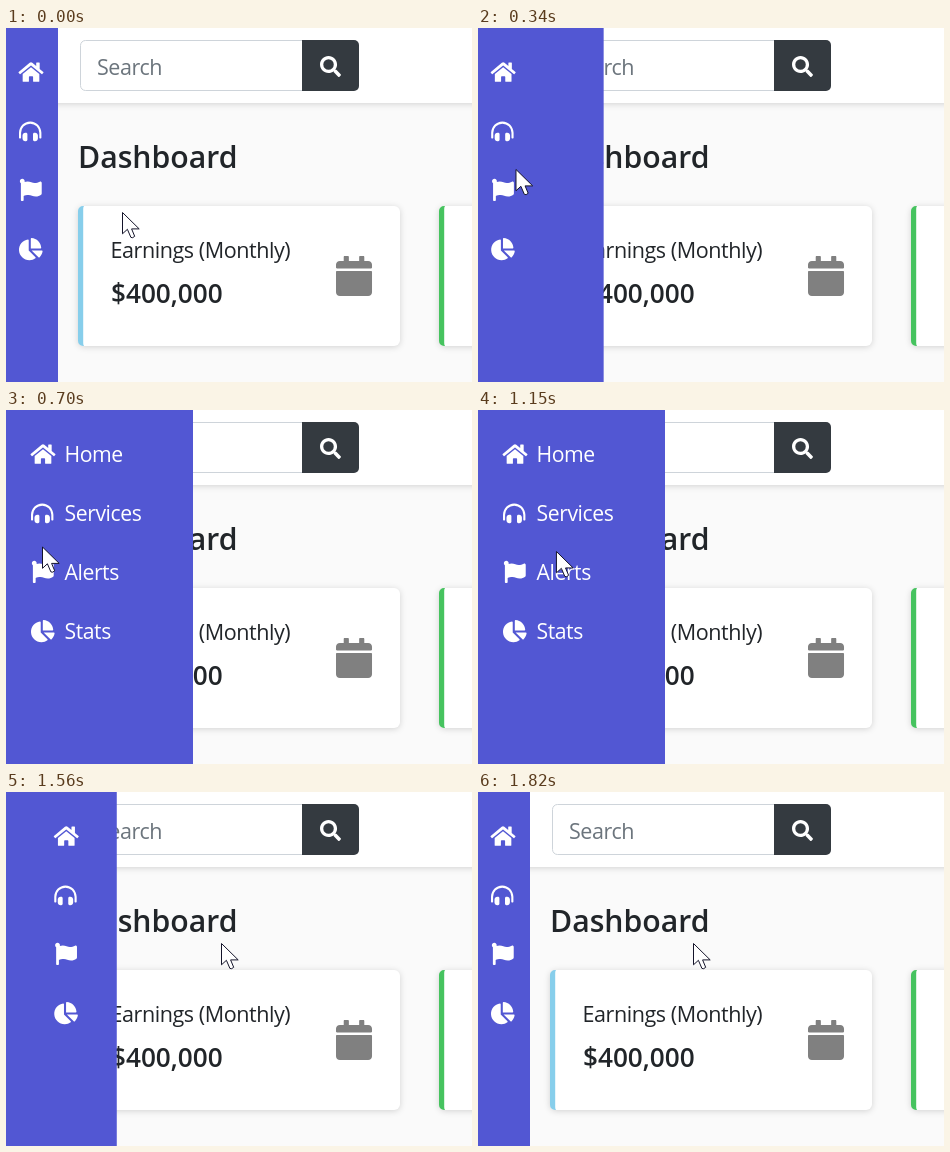
Animation, 466 px wide and 354 px high, one loop 2000 ms. Source, as an HTML page:

```html
<!DOCTYPE html>
<html lang="en">
<head>
<meta charset="utf-8">
<title>Dashboard</title>
<style>
  html, body { margin: 0; width: 100%; height: 100%; overflow: hidden; background: #fafafa; }
  svg { display: block; width: 100vw; height: 100vh; }
  text { font-family: "Open Sans", "Noto Sans", sans-serif; font-size: 21.5px; letter-spacing: -.02em; fill: #212529; white-space: pre; }
  .bold { font-weight: 600; letter-spacing: 0; }
  .side text, .side path { fill: #fff; }
  .side text { font-size: 21.2px; }
  .soft { filter: drop-shadow(0 1px 3px rgba(0, 0, 0, .16)); }
</style>
</head>
<body>
<svg viewBox="0 0 466 354">
  <rect width="466" height="354" fill="#fafafa"/>
  <rect class="soft" x="-10" y="-10" width="486" height="85" fill="#fff"/>

  <rect x="74.5" y="12.5" width="240" height="50" rx="5" fill="#fff" stroke="#ced4da"/>
  <path d="M296 12h52a5 5 0 0 1 5 5v41a5 5 0 0 1-5 5h-52z" fill="#343a40"/>
  <path transform="translate(314 28) scale(.041)" fill="#fff" d="M505 442.7L405.3 343c-4.500-4.500-10.600-7-17-7H372c27.600-35.300 44-79.700 44-128C416 93.100 322.900 0 208 0S0 93.100 0 208s93.100 208 208 208c48.300 0 92.700-16.400 128-44v16.300c0 6.400 2.500 12.500 7 17l99.700 99.700c9.400 9.400 24.600 9.400 33.900 0l28.300-28.300c9.400-9.400 9.400-24.600.1-34zM208 336a128 128 0 1 1 0-256a128 128 0 0 1 0 256z" fill-rule="evenodd"/>
  <text x="91" y="47" style="fill:#6c757d">Search</text>

  <text class="bold" x="72" y="140" style="font-size:30.2px">Dashboard</text>

  <g class="soft">
    <rect x="72" y="178" width="322" height="140" rx="6" fill="#fff"/>
    <rect x="433" y="178" width="322" height="140" rx="6" fill="#fff"/>
  </g>
  <path id="edge" d="M78 178h-1a5 5 0 0 0-5 5v130a5 5 0 0 0 5 5h1q-.8-1-.8-3V181q0-2 .8-3z" fill="#87ceeb"/>
  <use href="#edge" x="361" style="display:none"/>
  <path transform="translate(361 0)" d="M78 178h-1a5 5 0 0 0-5 5v130a5 5 0 0 0 5 5h1q-.8-1-.8-3V181q0-2 .8-3z" fill="#46c35f"/>
  <text x="104.5" y="230">Earnings (Monthly)</text>
  <text class="bold" x="105" y="274.5" style="font-size:26.2px">$400,000</text>
  <path transform="translate(330 228) scale(.0804 .0783)" fill="#808080" d="M12 192h424c6.600 0 12 5.400 12 12v260c0 26.500-21.500 48-48 48H48c-26.500 0-48-21.500-48-48V204c0-6.600 5.400-12 12-12zm436-44v-36c0-26.500-21.500-48-48-48h-48V12c0-6.600-5.400-12-12-12h-40c-6.600 0-12 5.400-12 12v52H160V12c0-6.600-5.400-12-12-12h-40c-6.600 0-12 5.400-12 12v52H48C21.500 64 0 85.500 0 112v36c0 6.600 5.400 12 12 12h424c6.600 0 12-5.400 12-12z"/>

  <g class="side">
    <rect id="bar" width="52" height="354" fill="#5257d3"/>
    <g id="labels">
      <text y="52">Home</text>
      <text y="111">Services</text>
      <text y="170">Alerts</text>
      <text y="229">Stats</text>
    </g>
    <g id="icons">
      <path transform="translate(0 33) scale(.0434)" d="M280.400 148.300L96 300V464a16 16 0 0 0 16 16h112a16 16 0 0 0 16-16V368a16 16 0 0 1 16-16h64a16 16 0 0 1 16 16v96a16 16 0 0 0 16 16h112a16 16 0 0 0 16-16V300L295.700 148.300a12 12 0 0 0-15.300 0zM571.600 251.500L488 182.600V44a12 12 0 0 0-12-12h-56a12 12 0 0 0-12 12v72.600L318.500 43a48 48 0 0 0-61 0L4.300 251.500a12 12 0 0 0-1.600 16.900l25.500 31A12 12 0 0 0 45 301l235.400-193.700a12 12 0 0 1 15.300 0L531 301a12 12 0 0 0 16.900-1.600l25.500-31a12 12 0 0 0-1.800-16.900z"/>
      <path transform="translate(.5 92.2) scale(.04375)" d="M160 288h-16c-35.400 0-64 28.700-64 64.100v63.800c0 35.400 28.600 64.100 64 64.100h16c17.700 0 32-14.400 32-32V320c0-17.700-14.300-32-32-32zm208 0h-16c-17.700 0-32 14.300-32 32v128c0 17.700 14.300 32 32 32h16c35.400 0 64-28.700 64-64.100v-63.800c0-35.400-28.600-64.100-64-64.100zM256 32C112.900 32 4.600 151.100 0 288v112a16 16 0 0 0 16 16h16a16 16 0 0 0 16-16V288a208 208 0 0 1 416 0v112a16 16 0 0 0 16 16h16a16 16 0 0 0 16-16V288C507.400 151.100 399.100 32 256 32z"/>
      <path transform="translate(1 150.8) scale(.0434)" d="M349.600 98.800C296 98.800 251.700 64 184.300 64c-25 0-47.300 4.400-68 12a56 56 0 0 0 3.600-23.500C118 24 94.800 1.200 66.300 0 34.300-1.200 8 24.300 8 56c0 19 9.500 35.800 24 46V488c0 13.300 10.700 24 24 24h16c13.300 0 24-10.700 24-24v-94.400c28.300-12 63.600-22.100 114.400-22.100 53.600 0 97.900 34.800 165.200 34.800 48.200 0 86.700-16.300 122.500-40.900 8.700-6 13.900-15.800 13.900-26.400V96c0-23.400-24.300-38.900-45.500-29-34.300 15.900-76.400 31.800-116.900 31.800z"/>
      <path transform="translate(.5 210) scale(.0434)" d="M527.800 288H290.500l158 158c6 6 16 6.500 22.200.7 38.700-36.500 65.300-85.600 73.100-140.900 1.400-9.400-6.500-17.800-16-17.800zM512 223.200C503.700 103.700 408.300 8.300 288.800 0 279.700-.6 272 7.100 272 16.200V240h223.800c9.100 0 16.800-7.700 16.200-16.800zM224 288V50.700c0-9.500-8.400-17.400-17.800-16C87 51.500-4 155.600 0 280.400 4.500 408.500 114.800 513.600 243 512c50.400-.6 97-16.900 135.300-44 7.900-5.600 8.400-17.300 1.600-24.100L224 288z"/>
    </g>
  </g>

  <path id="arrow" d="M.5.5V21.800L5.400 17.300L8.900 25.400Q10.500 26.500 12.700 24.300L9.600 16.900H17.200Z" fill="#fff" stroke="#14142a" stroke-linejoin="round"/>
  <path id="beam" d="M-6-13.500h4q2 0 2 2v23q0 2-2 2h-4M6-13.500h-4q-2 0-2 2M6 13.500h-4q-2 0-2-2" fill="none" stroke="#ececee" stroke-width="1.300"/>
</svg>
<script>
const LOOP = 2000, NARROW = 52, WIDE = 187;
const OPEN = { at: 178, len: 430 }, CLOSE = { at: 1409, len: 385 };
const BEAM = [1415, 1470];
// time, x, y of the pointer
const TRAIL = [
  [15, 116, 184], [180, 50, 149], [340, 37.5, 141], [600, 36, 136.5],
  [990, 36, 136.5], [1150, 77.5, 141], [1400, 186, 149], [1440, 213.5, 150.5], [1490, 215, 151]
];
const [bar, labels, icons, arrow, beam] =
  ["bar", "labels", "icons", "arrow", "beam"].map(id => document.getElementById(id));

const clamp = v => Math.min(1, Math.max(0, v));
const move = (el, x, y = 0) => el.setAttribute("transform", `translate(${x.toFixed(2)} ${y.toFixed(2)})`);
const show = (el, on) => el.setAttribute("visibility", on ? "visible" : "hidden");

// cubic-bezier(0, 0, .58, 1)
function easeOut(x) {
  let lo = 0, hi = 1;
  for (let i = 0; i < 24; i++) {
    const s = (lo + hi) / 2;
    if (s * s * (1.74 - .74 * s) < x) lo = s; else hi = s;
  }
  return lo * lo * (3 - 2 * lo);
}

const phase = (t, p) => easeOut(clamp((t - p.at) / p.len));

function pointer(t) {
  const i = TRAIL.findIndex(p => p[0] > t);
  if (i === 0) return TRAIL[0].slice(1);
  if (i < 0) return TRAIL[TRAIL.length - 1].slice(1);
  const a = TRAIL[i - 1], b = TRAIL[i], k = (t - a[0]) / (b[0] - a[0]);
  return [a[1] + (b[1] - a[1]) * k, a[2] + (b[2] - a[2]) * k];
}

function draw(t) {
  const closing = t >= CLOSE.at || t < OPEN.at;
  const f = t < CLOSE.at ? phase(t, OPEN) : 1 - phase(t, CLOSE);
  const width = NARROW + (WIDE - NARROW) * f;
  bar.setAttribute("width", width.toFixed(2));

  move(icons, closing ? 12.5 + .6 * (width - NARROW) : Math.max(12.5, 24.5 - 26 * (1 - f)));
  move(labels, 58.5 - 470 * Math.pow(1 - f, 1.4));
  labels.setAttribute("opacity", Math.sqrt(f).toFixed(3));

  const [x, y] = pointer(t);
  const onText = t >= BEAM[0] && t < BEAM[1];
  show(arrow, !onText);
  show(beam, onText);
  move(arrow, x, y);
  move(beam, x, y);
}

const start = performance.now();
function tick() {
  draw((performance.now() - start) % LOOP);
  requestAnimationFrame(tick);
}
draw(0);
requestAnimationFrame(tick);
</script>
</body>
</html>
```
